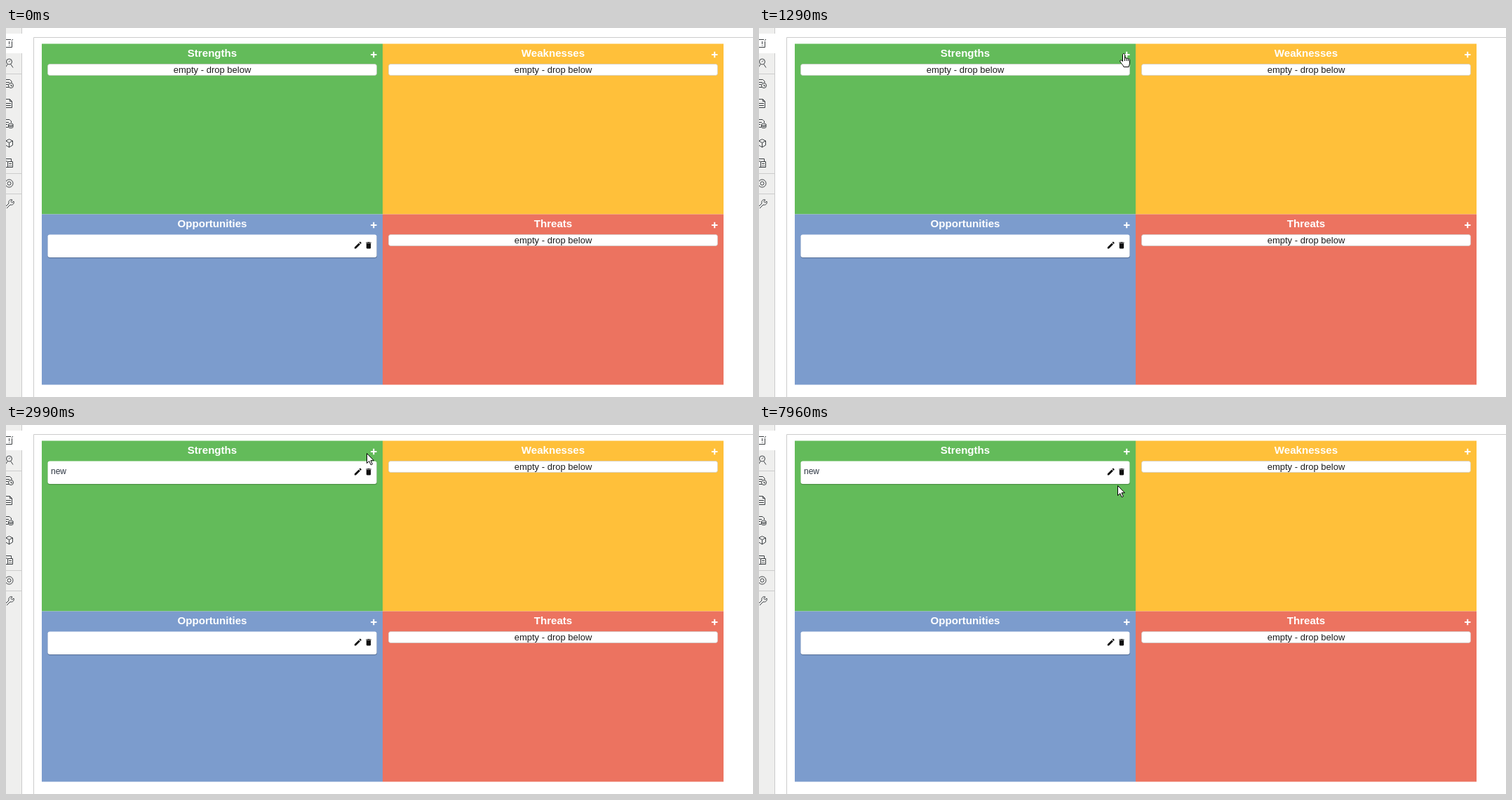
An HTML page that plays this animation: 1065x526 px, repeating every 8 s.

```html
<!DOCTYPE html>
<html>
<head>
<meta charset="utf-8">
<style>
html, body { margin: 0; width: 100%; height: 100%; overflow: hidden; background: #fff; }
svg { display: block; width: 1065px; height: 526px; font-family: "Liberation Sans", Arial, sans-serif; }
.title { font-weight: bold; font-size: 15.1px; fill: #fff; text-anchor: middle; }
.empty { font-size: 13px; fill: #1c1c1c; text-anchor: middle; }
.new { font-size: 12px; fill: #2b3440; }
.line { fill: none; stroke: #3c4043; }
.rule { fill: none; stroke: #ccc; }
#cursor path { fill: #fff; stroke: #000; stroke-linejoin: round; }
</style>
</head>
<body>
<svg viewBox="0 0 1065 526">
  <defs>
    <g id="tools" fill="#111">
      <path transform="translate(495.2 60) scale(.55)" d="M3 17.25V21h3.75L17.81 9.94l-3.75-3.75zM20.71 7.04a1 1 0 0 0 0-1.41l-2.34-2.34a1 1 0 0 0-1.41 0l-1.83 1.83 3.75 3.75z"/>
      <path transform="translate(510.6 60.3) scale(.53)" d="M6 19a2 2 0 0 0 2 2h8a2 2 0 0 0 2-2V7H6zM19 4h-3.5l-1-1h-5l-1 1H5v2h14z"/>
    </g>
    <g id="card">
      <rect x="59.5" y="52.5" width="469.5" height="32.7" rx="3" fill="#000" opacity=".22"/>
      <rect x="59.5" y="51.5" width="469" height="32.5" rx="3" fill="#fff"/>
      <use href="#tools"/>
    </g>
  </defs>

  <rect width="22" height="526" fill="#efefee"/>
  <rect y="8" width="23" height="28" fill="#fff"/>
  <path class="rule" d="M22.5 0V8M22.5 36V526M0 65.5H22M0 207.5H22M0 236.5H22M1065 13.5H39.5V526"/>
  <g class="line">
    <path d="M0 16.5H7M0 27.5H8.5V19M4.5 19v4M4.5 24.5v1M8 18l2-2"/>
    <path d="M2 52L-1 56.500M7 52l3 4.500M4 48.500l2-2"/><circle cx="4.500" cy="48" r="4"/>
    <path d="M0 73.500H5.500l2.500 2.500v2M0 77.500H5M0 80.500H3M0 84.500H4M7 80.500v2h2"/><circle cx="7" cy="82" r="3.500"/>
    <path d="M0 101.500H5.500l3 3v9H0M5.500 101.500v3h3M0 107.500H7M0 110.500H7"/>
    <path d="M0 130.500H5l2.500 2.500v2M0 134.500H4M0 137.500H2M0 141.500H3M3.500 137.500v4c1 1.500 5.500 1.500 6.500 0v-4M3.500 139.500c1 1.500 5.500 1.500 6.500 0"/><ellipse cx="6.750" cy="137.500" rx="3.250" ry="1.500"/>
    <path d="M4.500 158.500l5 2.500v6l-5 3-5-3v-6zM-.5 161l5 2.500 5-2.500M4.500 163.500v6.500"/>
    <path d="M0 186.500H7.500V190M0 198.500H9.500V190.500H2.500v8M4 193.500H8M4 196.500H5.500M6.500 196.500H8M0 190H2"/>
    <circle cx="4.500" cy="221.500" r="5.500"/><circle cx="4.500" cy="221.500" r="2.500"/>
    <path d="M-1 255L4 250C3 246 6 244 9 245L7 247.500l1.500 1.500L11 247c1 3-1 6-5 5L1 257"/>
  </g>

  <g id="board"></g>
  <g id="added">
    <use href="#card"/>
    <text class="new" x="64" y="70.300">new</text>
  </g>

  <g id="cursor">
    <path id="arrow" d="M.5 .5v14l3.300-3 2.400 5.300 2.200-1-2.400-5.100h4.400z"/>
    <g id="hand">
      <path d="M4.500 11.500V2.200c0-2.200 3-2.200 3 0V7.500c.3-1.300 2.600-1.300 2.700.3 .4-1 2.300-.9 2.400.7 .6-.8 1.900-.5 1.900 1v4.500c0 2-1.200 3-1.400 5.500H6C5.800 17.500 1.500 13.500 .8 11.800c-.6-1.600 1.400-2.600 2.400-1.400z"/>
      <path d="M7.500 7.500v3.500M10.200 8v3M12.600 8.700v2.500"/>
    </g>
    <path id="move" d="M0-9.500l3.500 4H1.200v4.300h4.300v-2.300l4 3.500-4 3.500v-2.300H1.200v4.300h2.300L0 9.500l-3.500-4h2.300V1.200h-4.300v2.300l-4-3.500 4-3.500v2.300h4.300v-4.300h-2.300z"/>
  </g>
</svg>
<script>
const LOOP = 8000, ADD_AT = 2150;
const $ = id => document.getElementById(id);

const emptySlot = id => `<g id="${id}">
  <rect x="59.5" y="51.5" width="469" height="16" rx="3" fill="#fff" stroke="#ccc" stroke-opacity=".7"/>
  <text class="empty" x="294" y="63.700">empty - drop below</text></g>`;

const panel = (title, color, x, y, body) => `<g transform="translate(${x} ${y})">
  <rect x="51" y="22.5" width="486" height="243" fill="${color}"/>
  <text class="title" x="294" y="40.500">${title}</text>
  <path d="M520 38h8.500M524.250 33.750v8.500" stroke="#fff" stroke-width="2"/>
  ${body}</g>`;

$('board').innerHTML =
  panel('Strengths', '#63bb5a', 0, 0, emptySlot('slot')) +
  panel('Weaknesses', '#ffc03a', 486, 0, emptySlot('slotW')) +
  panel('Opportunities', '#7c9ccd', 0, 243, '<use href="#card"/>') +
  panel('Threats', '#ec7360', 486, 243, emptySlot('slotT'));

// The pointer is sampled: each entry holds until the next one.
const glide = Array.from({length: 8}, (_, k) => {
  const left = (1 - k / 7) ** 1.6;
  return [210 + k * 77, 'arrow', 505 + 236 * left, 38 + 417 * left];
});
const path = [
  [0, ''], ...glide,
  [830, 'arrow', 510, 33], [900, 'arrow', 514, 27], [980, 'arrow', 518, 22],
  [1060, 'hand', 524, 28], [1140, 'hand', 525, 34], [1210, 'hand', 519, 36], [1290, 'hand', 514, 36],
  [1520, 'hand', 519, 35], [1600, 'hand', 523, 34],
  [1980, 'hand', 523, 23], [2070, 'hand', 523, 34],
  [2910, 'hand', 520, 36], [2990, 'arrow', 514, 40], [3060, 'arrow', 505, 43],
  [3140, 'arrow', 495, 45], [3220, 'arrow', 485, 47], [3290, 'arrow', 478, 48], [3370, ''],
  [7810, 'move', 500, 75], [7890, 'move', 506, 81], [7960, 'arrow', 511, 86]
];

function draw(now) {
  const t = now % LOOP;
  const [, kind, x = 0, y = 0] = path.findLast(p => p[0] <= t);
  for (const id of ['arrow', 'hand', 'move']) $(id).style.display = id === kind ? '' : 'none';
  $('cursor').setAttribute('transform', `translate(${Math.round(x)} ${Math.round(y)})`);
  $('added').style.display = t >= ADD_AT ? '' : 'none';
  $('slot').style.display = t < ADD_AT ? '' : 'none';
}

const start = performance.now();
function tick() {
  draw(performance.now() - start);
  requestAnimationFrame(tick);
}
tick();
</script>
</body>
</html>
```
